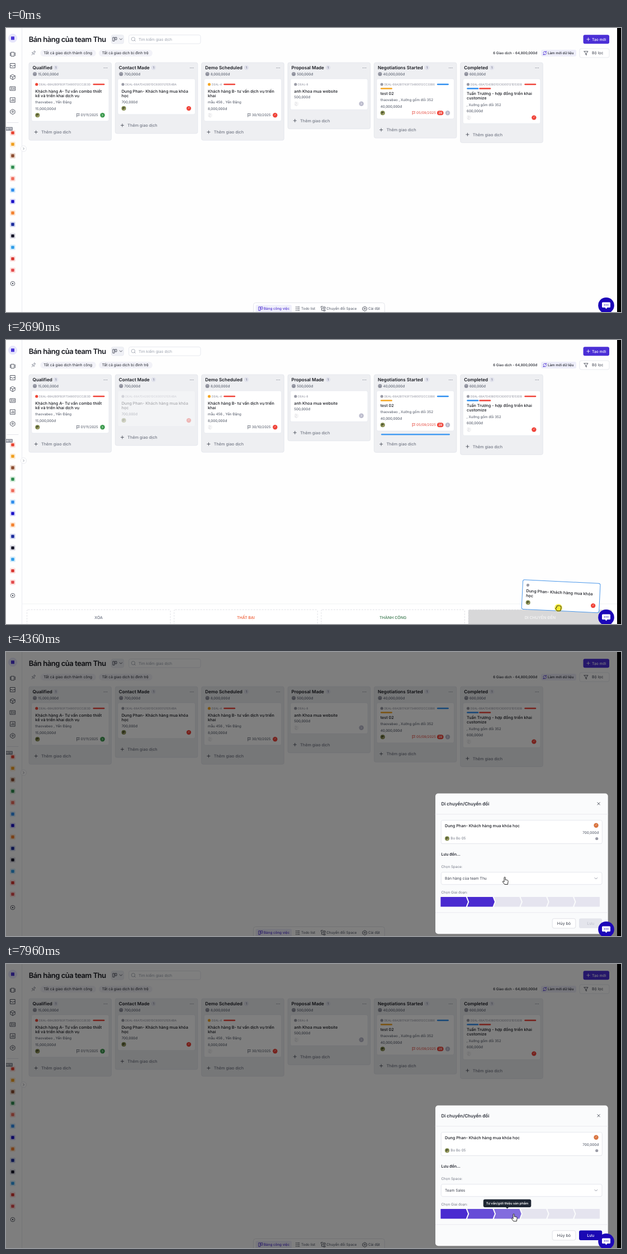
These frames come from a looping animation (1100x509 px, 8 s). An HTML page:

```html
<!DOCTYPE html>
<html lang="vi">
<head>
<meta charset="utf-8">
<title>Bảng giao dịch</title>
<style>
html, body { margin: 0; width: 100%; height: 100%; overflow: hidden; background: #fff; }
svg { display: block; width: 100vw; height: 100vh; font-family: Inter, "Noto Sans", sans-serif; text-rendering: geometricPrecision; }
</style>
</head>
<body>
<svg id="stage" viewBox="0 0 1100 509"></svg>
<script>
const LOOP = 8000;
const M = 'font-weight="500"', B = 'font-weight="600"', MID = 'text-anchor="middle"', END = 'text-anchor="end"';
const RED = '#f0443a', BLUE = '#2f8ff0', AMBER = '#f5a623', VIOLET = '#4a2bd0', INK = '#16181f', GREY = '#9a9ba6', CHAT = '#1c06b8';

// Drawing helpers; y of text is its optical middle
const txt = (x, y, s, size = 6.25, fill = '#4a5160', o = '') =>
  `<text x="${x}" y="${(y + size * .36).toFixed(2)}" font-size="${size}" fill="${fill}" ${o}>${s}</text>`;
const box = (x, y, w, h, r, fill, o = '') =>
  `<rect x="${x}" y="${y}" width="${w}" height="${h}" rx="${r}" fill="${fill}" ${o}/>`;
const dot = (x, y, r, fill, o = '') => `<circle cx="${x}" cy="${y}" r="${r}" fill="${fill}" ${o}/>`;
const pen = (d, c = '#3a3f4c', w = .85, o = '') =>
  `<path d="${d}" fill="none" stroke="${c}" stroke-width="${w}" stroke-linecap="round" stroke-linejoin="round" ${o}/>`;
const edge = (c, w = .7) => `stroke="${c}" stroke-width="${w}"`;
const grp = (id, s, o = '') => `<g id="${id}" ${o}>${s}</g>`;
const at = (x, y, s) => `<g transform="translate(${x} ${y})">${s}</g>`;

const ruler = document.createElement('canvas').getContext('2d');
function textWidth(s, size, weight = 400) {
  ruler.font = `${weight} 100px Inter, "Noto Sans", sans-serif`;
  return ruler.measureText(s).width * size / 100;
}

const plus = (x, y, c, r = 2.6) => pen(`M${x - r} ${y}h${2 * r}M${x} ${y - r}v${2 * r}`, c, .8);
const caret = (x, y, c = '#7b8190') => pen(`M${x - 2.3} ${y - 1.1}l2.3 2.3 2.3-2.3`, c);
const lens = (x, y, r) => dot(x, y, r, 'none', edge('#8c92a0')) + pen(`M${x + r * .7} ${y + r * .7}l1.5 1.5`, '#8c92a0');
const board = (x, y, c) => pen(`M${x - 3.2} ${y - 3.2}h2.7v6.6h-2.7zM${x + .8} ${y - 3.2}h2.7v4.2h-2.7z`, c);
const refresh = (x, y, c) => pen(`M${x - 2.8} ${y - .4}a2.9 2.9 0 0 1 5.2-1.3M${x + 2.8} ${y + .4}a2.9 2.9 0 0 1-5.2 1.3M${x + 2.6} ${y - 3.3}v1.7h-1.7M${x - 2.6} ${y + 3.3}v-1.7h1.7`, c);
const gear = (x, y, r) => pen(`M${x - r} ${y - r * .5}l${r}-${r * .6} ${r} ${r * .6}v${r * 1.1}l-${r} ${r * .6}-${r}-${r * .6}z`) + dot(x, y, r * .36, 'none', edge('#3a3f4c', .8));
const flag = (x, y, c) => pen(`M${x - 2} ${y + 3.2}v-6M${x - 2} ${y - 2.6}h4.6l-1.1 1.7 1.1 1.7h-4.6`, c, .7);
const face = (x, y) => dot(x, y, 4, '#7f8a4c') + dot(x - .4, y - .6, 1.8, '#4f5233') + dot(x + 1, y + 1.5, 1.2, '#b9a77c');
const ghost = (x, y) => dot(x, y, 4, '#f5f5f6') + pen(`M${x - 2} ${y - 3}q4 1 1 3.5t2 3`, '#d3d3d8', .6);
const arrow = (x, y, dir, c) => dot(x, y, 4.2, c) + pen(`M${x - dir * .8} ${y - 1.5}l${dir * 1.6} 1.5-${dir * 1.6} 1.5`, '#fff', .8);

// Board data
const lead = 'Dung Phan- Khách hàng mua khóa';
const cols = [
  { name: 'Qualified', n: 89, sum: '15,000,000đ', id: 'DEAL-68A2B0FB3F73480012CC2E3D', c: '#ee4434', tags: [[110, 0, RED]],
    title: ['Khách hàng A- Tư vấn combo thiết', 'kế và triển khai dịch vụ'], who: 'thaovabeo , Yến Đặng', pic: face, due: '01/11/2025', go: [1, '#3c9a4e'] },
  { name: 'Contact Made', n: 264, sum: '700,000đ', id: 'DEAL-68A7D429D1DC8300121D54BA', c: GREY, tags: [],
    title: [lead, 'học'], pic: face, go: [-1, RED] },
  { name: 'Demo Scheduled', n: 430, sum: '8,000,000đ', id: 'DEAL-4', c: AMBER, tags: [[35, 0, RED]],
    title: ['Khách hàng B- tư vấn dịch vụ triển', 'khai'], who: 'mẫu 456 , Yến Đặng', pic: ghost, due: '30/10/2025', go: [-1, RED] },
  { name: 'Proposal Made', n: 576, sum: '500,000đ', id: 'DEAL-8', c: GREY, tags: [], title: ['anh Khoa mua website'], pic: ghost, go: [1, '#bcbccd'] },
  { name: 'Negotiations Started', n: 753, sum: '40,000,000đ', id: 'DEAL-68A2B1743F73480012CC33B6', c: GREY, tags: [[108, 0, BLUE], [7, 1, AMBER]],
    title: ['test 02'], who: 'thaovabeo , Xưởng gốm đồi 352', pic: face, due: '05/09/2025', late: '28', go: [1, '#bcbccd'] },
  { name: 'Completed', n: 869, sum: '600,000đ', id: 'DEAL-68A7D40BD1DC8300121D53DB', c: GREY, tags: [[110, 0, RED], [7, 1, BLUE], [29, 1, RED]],
    title: ['Tuấn Trương - hợp đồng triển khai', 'customize'], who: ', Xưởng gốm đồi 352', pic: ghost, go: [-1, RED] }
];

function column(c, i) {
  const x = c.x = 41 + 154.35 * i;
  let y = c.tags.some(t => t[1]) ? 117.5 : 113.1;
  let s = dot(x + 13.8, 101, 2.6, c.c) + txt(x + 18, 101.1, c.id, 5.15, '#8b8d9b');
  for (const [dx, row, col] of c.tags) s += box(x + 4.5 + dx, 99.8 + row * 7.5, 21, 2.4, 1.2, col);
  c.title.forEach((l, k) => s += txt(x + 11.3, y + k * 8.4, l, 7.2, INK, M));
  y += 8.4 * (c.title.length - 1);
  if (c.who) s += txt(x + 11.3, y += 11.5, c.who);
  s += txt(x + 11.3, y += c.who ? 11.6 : 11, c.sum);
  y += 11.6;
  s += c.pic(x + 15.3, y);
  const end = x + 131.6;
  s += arrow(end, y, ...c.go);
  if (c.late) s += box(end - 19, y - 4, 11.5, 8, 4, RED) + txt(end - 13.2, y, c.late, 5.4, '#fff', MID + B);
  if (c.due) {
    const right = end - (c.late ? 21 : 7.8), col = c.late ? '#e5483d' : '#4a5160';
    s += flag(right - textWidth(c.due, 6.2) - 5, y, col) + txt(right, y, c.due, 6.2, col, END);
  }
  const low = c.low = y + 10.8;
  return box(x, 62, 147.5, low + 34.2 - 62, 3, '#eeeff2', `id="bg${i}" ` + edge('#dfe1e8')) +
    txt(x + 6.5, 71, c.name, 8.1, INK, B) + dot(c.n, 71, 4.2, '#e0e1ec') + txt(c.n, 71, '1', 5.4, '#555b6a', MID) +
    [-2.6, 0, 2.6].map(d => dot(x + 137 + d, 71.5, .6, '#555b6a')).join('') +
    dot(x + 10.5, 82.6, 3.5, '#8e909c') + pen(`M${x + 8.6} 82a2 2 0 0 1 3.6 0`, '#c6c8d2', .6) + txt(x + 16.2, 82.7, c.sum) +
    grp('card' + i, box(x + 4.5, 91, 138.6, low - 91, 3, '#fff', edge('#e3e5ec')) + s) +
    grp('add' + i, plus(x + 12.7, low + 19.5, '#3a3f4c') + txt(x + 22, low + 19.5, 'Thêm giao dịch', 7.25, '#737885', M));
}

function sidebar() {
  const tints = [['#fde3df', '#e8412f'], ['#fdecd5', '#f0a020'], ['#ead9cf', '#8a4b2f'], ['#d9eede', '#2e8b4f'], ['#fde0dc', '#ee6a5a'],
    ['#d9ecfb', '#2f8ded'], ['#dcdcfb', '#1a10c8'], ['#fde8d6', '#f3812f'], ['#d8ddf2', '#1a2a9c'], ['#dcdce4', '#151528'],
    ['#d8eefb', '#2c9be8'], ['#fbdedd', '#d8352f'], ['#fde0de', '#e2484a']];
  let s = pen('M28.5 0V509', '#e4e6ec', .8) + dot(12, 18.3, 8, '#e6e5fb') + box(9, 15.3, 6, 6, .5, '#4a35d8');
  s += at(12, 47, pen('M-2.6-3.6h5.2v7.2h-5.2zM-4.4-2.6v5.2M4.4-2.6v5.2'));
  s += at(12, 67.5, pen('M-4.2-4h8.4v8h-8.4zM-4.2 0h2.6q1.6 2.6 3.2 0h2.6'));
  s += at(12, 88, pen('M0-4.4l4.2 2.2v4.4L0 4.4-4.2 2.2v-4.4zM-4.2-2.2L0 0l4.2-2.2M0 0v4.4'));
  s += at(12, 108.5, pen('M-4.6-3.4h9.2v6.8h-9.2zM1-1h2M1 1h2M-3 1.6q1.3-1.6 2.6 0') + dot(-1.7, -1, 1, 'none', edge('#3a3f4c')));
  s += at(12, 129, pen('M-4.2-4.2h8.4v8.4h-8.4zM-2 2v-2M0 2v-4M2 2v-3')) + gear(12, 150, 4);
  s += pen('M2 169.5H22', '#dfe1e8');
  tints.forEach(([a, b], i) => s += box(7, 182.9 + i * 20.52, 10, 10, 2.2, a) + box(9.3, 185.2 + i * 20.52, 5.4, 5.4, .8, b));
  s += box(-2, 177.5, 14, 6.6, 1, '#8b8f9a') + txt(.6, 180.9, 'BETA', 4, '#fff', B);
  s += dot(12, 458, 3.8, 'none', edge('#3a3f4c', .8)) + dot(12, 458, 1.2, '#3a3f4c');
  return s + dot(31.5, 216.3, 5.2, '#fff', edge('#e1e3ea')) + pen('M30.8 214.6l1.6 1.7-1.6 1.7', '#6b7180', .7);
}

function header() {
  return txt(40.7, 20, 'Bán hàng của team Thu', 13, INK, B + ' letter-spacing="-.45"') +
    box(188.5, 12.5, 22, 15.6, 3, '#f0f1f6', edge('#e3e5ec')) + board(194.5, 20, '#3a3f4c') + caret(205.5, 20, '#3a3f4c') +
    box(219.7, 12.5, 128.3, 15.6, 3, '#fff', edge('#dfe1e8')) + lens(227.5, 19.8, 3.2) + txt(237, 20.2, 'Tìm kiếm giao dịch', 6.75, '#9aa0ad') +
    box(1032.5, 12.3, 46.5, 16, 3, '#4b2fd6') + plus(1041.5, 20.2, '#fff') + txt(1048, 20.2, 'Tạo mới', 6.7, '#fff', M) +
    at(49, 45, pen('M-1.5-4h3M-1-4v3.2l-1.6 1.8h5.2L1-.8V-4M0 1v3.4', '#6b7180', .7, 'transform="rotate(40)"')) +
    box(61.5, 39, 99.5, 12, 6, '#f2f2f8') + txt(67.3, 45, 'Tất cả giao dịch thành công', 6.65, '#22252e') +
    box(166, 39, 96, 12, 6, '#f2f2f8') + txt(171.8, 45, 'Tất cả giao dịch bị đình trệ', 6.65, '#22252e') +
    txt(950.2, 45, '6 Giao dịch - 64,800,000đ', 6.25, '#22252e', M + END) +
    box(957, 39, 63, 12, 3, '#eeeefa') + refresh(963.7, 45, '#4b2fd6') + txt(969, 45, 'Làm mới dữ liệu', 6.2, '#22252e', M) +
    box(1026, 37, 53, 16, 3, '#fff', edge('#dfe1e8')) + pen('M1034 41.8h7l-2.7 3.4v3.3l-1.6-.9v-2.4z') + txt(1048, 45, 'Bộ lọc', 6.9, '#3a3f4c');
}

const toolbar = grp('toolbar', box(442.5, 492.5, 234.7, 24, 4, '#fff', edge('#d9dbe3')) + box(446.5, 496, 64.5, 16, 3, '#f0f0fb') +
  board(455.4, 503, VIOLET) + txt(461, 503, 'Bảng công việc', 6.25, VIOLET, M) +
  pen('M521 500h4M521 503h4M521 506h4') + [500, 503, 506].map(y => dot(518.9, y, .8, '#3a3f4c')).join('') + txt(528, 503, 'Todo list') +
  pen('M563.5 501v-2h3M571 505v2h-3M565 502h4v4h-4zM567.5 500h3.5v3') + txt(573.3, 503, 'Chuyển đổi Space') + gear(641.7, 503, 3.6) + txt(648, 503, 'Cài đặt'));

const zones = [['XÓA', '#6b7180'], ['THẤT BẠI', '#ee5a32'], ['THÀNH CÔNG', '#3c7a50'], ['DI CHUYỂN ĐẾN', '#8a8d98']];
const bar = grp('bar', box(29, 473, 1064, 60, 0, '#fff') + pen('M29 473H1093', '#f2f3f6', 1.2) + zones.map(([s, c], i) =>
  box(37.5 + i * 263.2, 483.4, 256.5, 40, 2, i == 3 ? '#fff' : 'none', `id="zone${i}" stroke-dasharray="3 2" ` + edge('#d4d6dd')) +
  txt(165.7 + i * 263.2, 497.7, s, 7, c, `id="zt${i}" ${M} ${MID}`)).join(''));

const dragged = grp('drag', box(-69.3, -26.3, 138.6, 52.6, 3, '#fff', edge('#4a97ea', 1)) + dot(-60, -17, 2.6, GREY) +
  txt(-62.5, -6.8, lead, 7.2, INK, M) + txt(-62.5, 1.6, 'học', 7.2, INK, M) + face(-58.3, 14) + arrow(58.3, 14, -1, RED));

// Dialog content is laid out from the dialog's top edge
const rows = ['Quy trình team hỗ trợ', 'Bán hàng', 'Quy trình hỗ trợ khách', 'Bán hàng dịp Tết', 'Team Sales'];
const step = 47.8;
const stageShape = i => {
  const x = 778 + step * i, r = i == 5 ? 0 : 3.2;
  return `M${x} 186h${step - 3.5}l${r} 8.25-${r} 8.25H${x}l${i ? 3.2 : 0}-8.25z`;
};
const dialog = grp('dialog', box(768, 254, 308.7, 251.3, 5, '#fafbfc', 'id="panel"') +
  grp('head', txt(778.4, 18.3, 'Di chuyển/Chuyển đổi', 8.05, '#2c303a', B) + pen('M1057.8 16.1l4.4 4.4M1062.2 16.1l-4.4 4.4') + pen('M768 37.3H1076.7', '#e4e6ec')) +
  `<g clip-path="url(#body)">` +
  grp('content', box(778.3, 48.6, 288, 42, 3, '#e1e3ea') + box(778.3, 48, 288, 42, 3, '#fff', edge('#dfe1e8')) +
    txt(785, 57.6, lead + ' học', 7.2, INK, M) + arrow(1055.5, 57.3, -1, '#d9743f') + txt(1060, 70.2, '700,000đ', 6.3, '#4a5160', END) +
    face(789, 80.7) + txt(795.3, 80.6, 'Bo Bo 05', 6.3, '#737885') + dot(1056.7, 81, 2.6, GREY) +
    txt(778.4, 109, 'Lưu đến...', 7.1, '#22252e', B) + txt(778.4, 131.5, 'Chọn Space:', 6.3, '#737885') +
    box(778.4, 141.2, 287.6, 22, 3, '#fff', 'id="select"') + txt(785, 152.2, '', 6.7, '#3a3f4c', 'id="space"') + grp('selCaret', caret(1055.3, 152.2)) +
    txt(778.4, 177, 'Chọn Giai đoạn:', 6.3, '#737885') +
    grp('stages', cols.map((_, i) => `<path id="st${i}" d="${stageShape(i)}" stroke-width="1.2" stroke-linejoin="round"/>`).join(''))) +
  grp('foot', pen('M768 467H1076.7', '#e4e6ec') + box(977.2, 477.8, 41.6, 17.2, 3, '#fff', edge('#d4d6dd')) + txt(998, 486.5, 'Hủy bỏ', 7.2, '#3a3f4c', MID) +
    box(1025, 477.5, 41.2, 17.6, 3, '#e4e5ec', 'id="save"') + txt(1045.6, 486.4, 'Lưu', 7.2, '#c3c5cf', `id="saveText" ${M} ${MID}`)) +
  grp('menu', box(778.7, 166, 285.5, 180, 3, '#fff', edge('#dfe1e8')) + box(787.5, 174.8, 268.5, 20, 3, '#fff', edge('#dfe1e8')) +
    lens(796, 184.2, 3.9) + txt(805, 184.6, 'Tìm kiếm', 6.7, '#9aa0ad') + refresh(791.3, 208, '#2a17b5') + txt(799.3, 208, 'Làm mới lại danh sách', 7.05, '#2a17b5', M) +
    box(779.2, 0, 284.6, 18.4, 0, '#f3f4f7', 'id="hover"') + rows.map((s, i) => txt(785, 227.5 + i * 18.45, s, 6.75, '#3a3f4c')).join('')) +
  `</g>` + box(1074.6, 291, 1.7, 172, .8, '#b4b6c0', 'id="thumb"') +
  grp('tip', box(0, 421.8, 10, 14.2, 3, '#1f2733', 'id="tipBox"') + `<path id="tipArrow" d="M-3 435.6h6l-3 3z" fill="#1f2733"/>` + txt(0, 429, '', 5.8, '#fff', `id="tipText" ${B} ${MID}`)));

const chat = dot(1073.5, 497.2, 14.3, CHAT) +
  `<path d="M1067.5 491.5h12q1.5 0 1.5 1.5v6.5q0 1.5-1.5 1.5h-4l-2 2.4-2-2.4h-4q-1.5 0-1.5-1.5v-6.5q0-1.5 1.5-1.5z" fill="#fff"/>` +
  [-3, 0, 3].map(d => dot(1073.5 + d, 496.3, .9, CHAT)).join('');

const ink = 'stroke="#111" stroke-width=".9" stroke-linejoin="round"';
const cursor = grp('cursor', dot(0, 0, 7, '#f8ec1c', 'id="press" opacity=".75"') +
  `<path id="arrow" d="M0 0V10.5L2.4 8.3 4.2 12.2 6 11.4 4.2 7.6H7.4Z" fill="#fff" ${ink}/>` +
  `<path id="hand" d="M-1 1C-1-.6 1.2-.6 1.2 1V5L2.6 4.8 4.2 5.3 5.6 5.9C6.3 6.3 6.2 7 6.1 8L5.3 13H-.2L-3.6 8.6C-4.2 7.4-2.8 6.8-2 7.6L-1 8.6Z" fill="#fff" ${ink}/>` +
  `<path id="fist" d="M-3-3q1-1.6 2-.4 1-1.6 2.2-.2 1.4-1 2 .4 1.6-.4 1.7 1.2v3l-1.4 4.6h-5.8l-2.6-4q-.8-2 1.7-1.6z" fill="#f3e72c" ${ink}/>`);

const stage = document.getElementById('stage');
stage.innerHTML = `<defs><clipPath id="body">${box(768, 291, 308.7, 214, 5, '#000', 'id="bodyClip"')}</clipPath></defs>` +
  box(0, 0, 1100, 509, 0, '#fefefe') + sidebar() + header() + cols.map(column).join('') + box(0, 0, 123, 2.5, 1.2, '#459cf2', 'id="slot"') +
  toolbar + bar + dragged + box(0, 0, 1093, 509, 0, '#000', 'id="shade"') + dialog + chat + cursor + box(1093, 0, 7, 509, 0, '#000');

const el = {};
stage.querySelectorAll('[id]').forEach(n => el[n.id] = n);
const set = (id, a) => { for (const k in a) el[id].setAttribute(k, a[k]); };
const show = (id, on) => set(id, { display: on ? 'inline' : 'none' });
const move = (id, x, y, more = '') => set(id, { transform: `translate(${x} ${y})${more}` });
const clamp = v => Math.max(0, Math.min(1, v));
const during = (t, a, b) => t >= a && t < b;

// Position along [time, ...values] keys
function along(keys, t) {
  let i = 0;
  while (i < keys.length - 2 && t >= keys[i + 1][0]) i++;
  const [a, b] = [keys[i], keys[i + 1]], p = clamp((t - a[0]) / (b[0] - a[0]));
  return a.slice(1).map((v, k) => v + (b[k + 1] - v) * p);
}

const pointer = [[310, 1064, 506], [500, 900, 430], [800, 420, 240], [960, 150, 150], [1060, 110, 135], [1130, 110, 135], [1390, 263, 139],
  [1790, 263, 139], [1990, 529.5, 209.5], [2090, 530, 210], [2230, 640, 262], [2330, 751, 331], [2440, 895, 426], [2550, 980, 471],
  [2690, 988, 480], [2760, 988, 480], [2950, 992, 488], [3360, 968.5, 502], [3500, 968.5, 502], [3900, 930, 450], [4230, 892, 403.5],
  [4600, 892, 403.5], [5110, 884, 440], [5180, 884, 440], [5940, 832, 478], [6010, 832, 478], [6210, 826, 497], [6350, 825.5, 496.5],
  [6760, 825.5, 496.5], [7100, 852, 480], [7440, 848, 449], [7510, 848, 449], [7650, 896, 449], [7790, 938, 449], [7960, 908, 448]];
const carry = [[1790, 268, 123], [1990, 298, 127], [2090, 298, 127], [2230, 600, 240], [2330, 756, 315], [2440, 900, 410], [2550, 985, 455],
  [2690, 992.6, 459.3], [2760, 992.6, 459.3], [2950, 997, 468], [3360, 973, 486]];
const wheel = [[4850, 0], [5110, 22], [5200, 22], [5650, 57.5]];
const tips = ['', 'Tiếp cận', 'Tư vấn/giới thiệu sản phẩm', 'Đàm phán/báo giá'];

function drawBoard(t) {
  const drag = during(t, 1790, 3430), [x, y] = along(carry, t);
  show('drag', drag);
  move('drag', x, y, ' rotate(2.75)');
  set('card1', { opacity: during(t, 1790, 3640) ? .32 : 1 });
  show('toolbar', !drag);

  const over = during(t, 1860, 2830) ? [340, 495, 650].filter(v => x > v).length + 1 : -1;
  cols.forEach((c, i) => {
    const gap = i != over ? 0 : i == 1 ? 5.7 : 4.2;
    set('bg' + i, { height: c.low + 34.2 - 62 + gap });
    move('add' + i, 0, gap);
    move('card' + i, 0, i == 1 ? gap : 0);
  });
  show('slot', over > 0);
  if (over > 0) set('slot', { x: cols[over].x + (over == 1 ? 18 : 12.5), y: over == 1 ? 92.6 : cols[over].low + 5, width: over == 1 ? 112 : 123 });

  const rise = clamp((t - 1920) / 280), hot = t >= 2480;
  show('bar', drag && rise > 0);
  set('bar', { opacity: rise });
  move('bar', 0, (1 - rise) * 10);
  set('zone3', { fill: hot ? '#d8d8d9' : '#fff' });
  set('zt3', { fill: hot ? '#f6f6f6' : '#8a8d98' });
}

function drawDialog(t, x, y) {
  const fade = clamp((t - 3430) / 60), loaded = t >= 3900, open = during(t, 4500, 6820), sold = t >= 6820;
  const top = loaded ? 253.5 : 270, scroll = open ? along(wheel, t)[0] : 0;
  show('shade', fade > 0);
  set('shade', { opacity: fade * .5 });
  show('dialog', fade > 0);
  set('dialog', { opacity: fade });
  set('panel', { y: top, height: 505.3 - top });
  set('bodyClip', { y: top + 37.6, height: 467.7 - top });
  move('head', 0, top);
  move('content', 0, top - scroll);
  move('menu', 0, top - scroll);
  move('foot', 0, -scroll);
  el.space.textContent = t >= 6760 ? 'Team Sales' : loaded ? 'Bán hàng của team Thu' : 'Chọn Space';
  set('select', { stroke: open ? '#2a17b5' : '#dcdee6', 'stroke-width': open ? 1.1 : .7, width: open ? 285.6 : 287.6 });
  move('selCaret', open ? -2 : 0, 0);

  show('menu', open);
  show('thumb', open);
  set('thumb', { y: 291 + scroll * .73 });
  const row = Math.floor((y - (top - scroll + 218.3)) / 18.45);
  show('hover', row >= 0 && row < rows.length);
  set('hover', { y: 218.3 + row * 18.45 });

  const hit = sold && y > 440 && y < 457 ? Math.floor((x - 778) / step) : 0;
  const last = sold ? hit : 1;
  show('stages', loaded);
  cols.forEach((_, i) => {
    const c = i <= last ? VIOLET : '#e5e4ef';
    set('st' + i, { fill: c, stroke: c, opacity: sold && i <= last ? 1 - .16 * i : 1 });
  });
  show('tip', hit > 0);
  if (hit > 0) {
    const mid = 778 + step * (hit + .5) - 1, w = textWidth(tips[hit], 5.8, 600) + 10;
    el.tipText.textContent = tips[hit];
    set('tipText', { x: mid });
    set('tipBox', { x: mid - w / 2, width: w });
    move('tipArrow', mid, 0);
  }
  const ready = t >= 7030;
  set('save', { fill: ready ? '#1a08b4' : '#e4e5ec' });
  set('saveText', { fill: ready ? '#fff' : '#c3c5cf' });
}

function drawCursor(t, x, y) {
  const fist = during(t, 2090, 3430);
  const hand = during(t, 950, 2090) || during(t, 4130, 6820) || t >= 7350;
  show('cursor', t >= 310);
  move('cursor', x, y);
  show('fist', fist);
  show('hand', hand);
  show('arrow', !fist && !hand);
  show('press', during(t, 1790, 3430) || during(t, 4430, 4570) || during(t, 6680, 6760));
}

function draw(t) {
  const [x, y] = along(pointer, t);
  drawBoard(t);
  drawDialog(t, x, y);
  drawCursor(t, x, y);
}

const start = performance.now();
function tick() {
  draw((performance.now() - start) % LOOP);
  requestAnimationFrame(tick);
}
tick();
</script>
</body>
</html>
```
